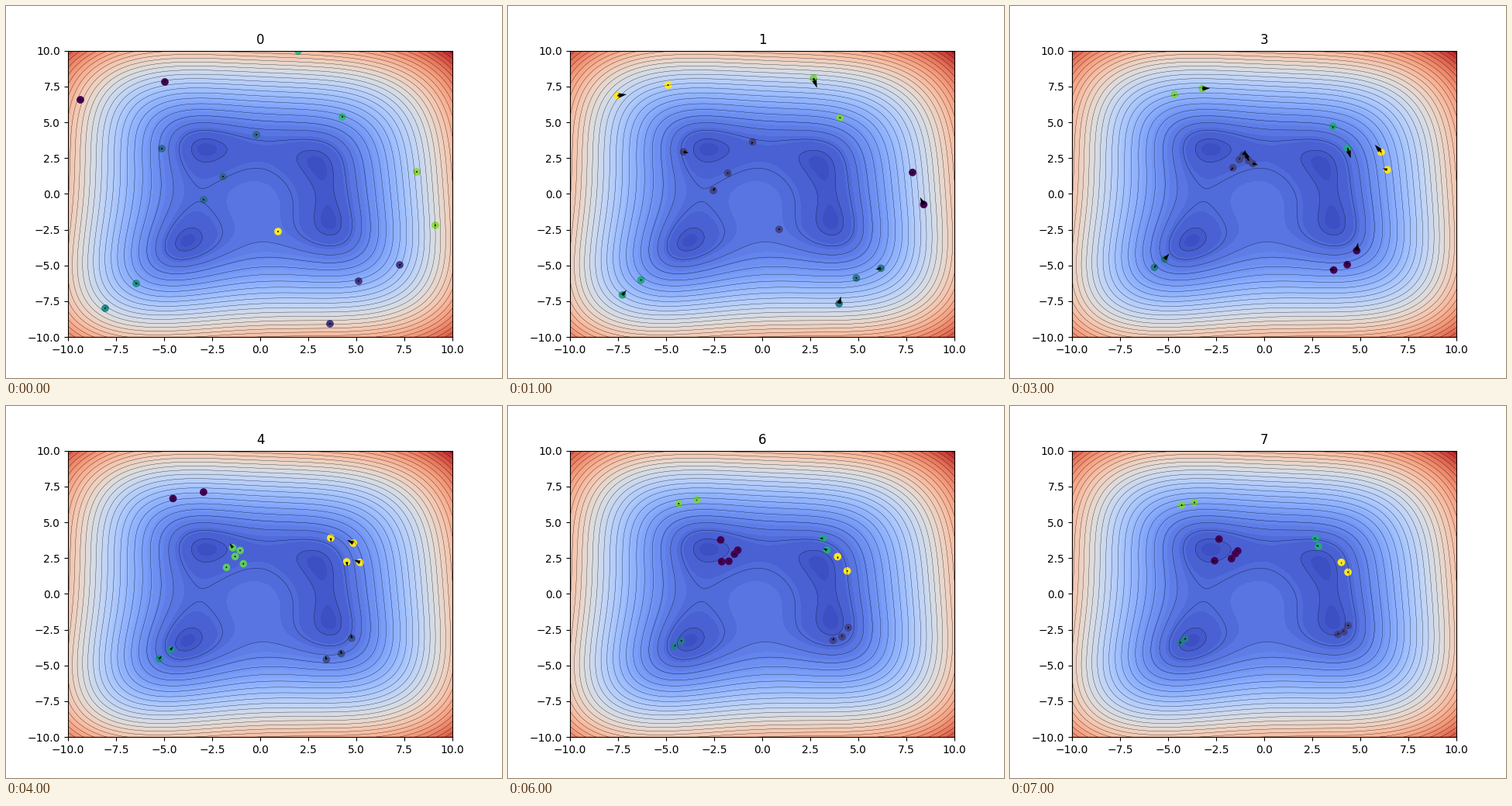
Recreate the animation shown at these times as a matplotlib script. Size 640 by 480 pixels, loop 8 s.

```python
import numpy as np
import matplotlib.pyplot as plt
from matplotlib.animation import FuncAnimation

STEPS = 8
TURN = 2        # step at which a swarm has met
DAMPING = 0.6   # how fast particles settle on their goal


def to_data(points):
    """Stage pixels to axes coordinates."""
    px = np.atleast_2d(np.array(points, float))
    return np.column_stack([(px[:, 0] - 80) / 24.8 - 10,
                            10 - (px[:, 1] - 57.6) / 18.48])


def swarm(tag, starts, meet, goal, lead=0.4, spread=0.0):
    """Particles gather near a meeting point, then settle like damped springs."""
    start, meet, goal = to_data(starts), to_data(meet), to_data(goal)
    turn = meet + spread * (start - meet)
    speed = (1 - lead) * (turn - start)
    gap = turn - goal
    path = [start, start + lead * (turn - start)]
    for s in range(STEPS - TURN):
        path.append(goal + (gap + (speed + DAMPING * gap) * s) * np.exp(-DAMPING * s))
    return tag, np.array(path)


swarms = [
    swarm("A", [(96, 121), (205, 98)], (209, 108), (224, 131)),
    swarm("B", [(323, 166), (255, 250), (280, 220)], (294, 203), (288, 190),
          lead=0.3, spread=0.15),
    swarm("B", [(201, 184)], (286, 198), (240, 197), lead=0.3),
    swarm("L", [(351, 291)], (328, 236), (262, 172), lead=0.05),
    swarm("C", [(128, 390), (168, 358)], (177, 347), (229, 297)),
    swarm("D", [(418, 410), (455, 355), (508, 334)], (441, 345), (431, 280)),
    swarm("E", [(377, 58), (434, 143)], (420, 146), (432, 215)),
    swarm("F", [(554, 283), (530, 214)], (510, 216), (374, 172)),
]

# Order of the clusters along the colour map; joined tags share a colour
orders = [
    "A D B C E F L",
    "F BL D C E A",
    "D BL C E A F",
    "D BL C E A F",
    "A D C BL EF",
    "EF BL C D A",
    "BL D C F A E",
    "BL D C F A E",
]


def shades(order):
    groups = order.split()
    rank = {tag: i / (len(groups) - 1) for i, group in enumerate(groups) for tag in group}
    return np.array([rank[tag] for tag, path in swarms for _ in path[0]])


pos = np.concatenate([path for _, path in swarms], axis=1)
vel = np.zeros_like(pos)
vel[1:] = np.diff(pos, axis=0)
colours = [shades(order) for order in orders]

fig, ax = plt.subplots(figsize=(6.4, 4.8), dpi=100)

# Square root of a function with four minima
axis = np.linspace(-10, 10, 301)
X, Y = np.meshgrid(axis, axis)
Z = np.hypot(X**2 + Y - 11, X + Y**2 - 7)
ax.contourf(X, Y, Z, levels=np.r_[0, 3, 5, 9:145:3], cmap="coolwarm")
ax.contour(X, Y, Z, levels=np.arange(5, 145, 5), colors="black", linewidths=0.22)

dots = ax.scatter(*pos[0].T, c=colours[0], cmap="viridis", vmin=0, vmax=1)
arrows = ax.quiver(*pos[0].T, *vel[0].T, color="black", scale=76, width=0.0043)
title = ax.set_title("0")
ax.set_xlim(-10, 10)
ax.set_ylim(-10, 10)


def update(step):
    dots.set_offsets(pos[step])
    dots.set_array(colours[step])
    arrows.set_offsets(pos[step])
    arrows.set_UVC(*vel[step].T)
    title.set_text(str(step))
    return dots, arrows, title


anim = FuncAnimation(fig, update, frames=STEPS, interval=1000, repeat=True,
                     repeat_delay=0, blit=False)
plt.show()
```
